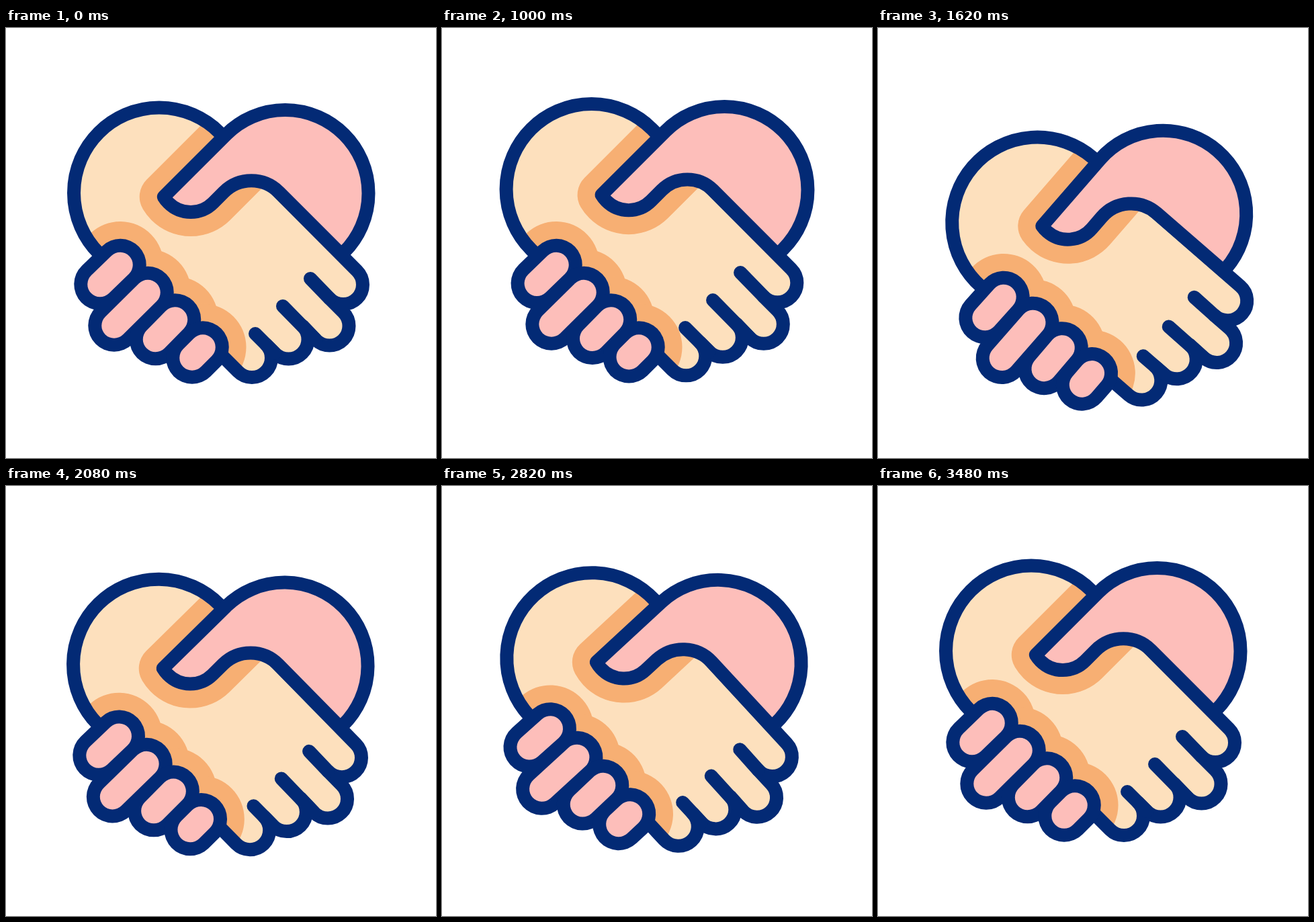
Animation of 640 by 640 pixels, one loop 3600 ms. Source, as an HTML page with a canvas:

```html
<!DOCTYPE html>
<html>
<head>
<meta charset="utf-8">
<style>
html, body { margin: 0; width: 100%; height: 100%; overflow: hidden; background: #fff; }
canvas { display: block; width: 640px; height: 640px; }
</style>
</head>
<body>
<canvas id="stage" width="640" height="640"></canvas>
<script>
const ctx = document.getElementById('stage').getContext('2d');
const NAVY = '#032a75', CREAM = '#fde0bd', PINK = '#fdbeba', SHADE = '#f7af73', SPARK = '#ff9100';
const LOOP = 3600, Q = Math.PI / 4, K = 20.5;

// Each key: time, value(s)
const OPEN = [[0, 0], [570, 1], [1150, 0]];
const SHAKE = [ // time, drop in px, tilt in degrees
  [1120, 0, 0], [1515, 45, -6], [1898, 0, 6], [2280, 45, -6],
  [2664, 0, 6], [3065, 45, -6], [3490, 0, 0]
];

// Right hand: finger tips. Left hand: lower end, upper end, how far the lower end retracts.
const TIPS = [[502, 382], [481.5, 443.5], [420.5, 463.5], [366, 491]];
const KNUCKLES = [
  [140, 381.5, 170, 352.5, 9.5], [161, 443, 211, 393.5, 15],
  [222.5, 463.5, 251.5, 434, 9], [277, 491, 293, 475, 9]
];

const ease = x => x ** 1.73 / (x ** 1.73 + (1 - x) ** 1.73);

function sample(keys, t) {
  if (t <= keys[0][0]) return keys[0].slice(1);
  const i = keys.findIndex(k => k[0] > t);
  if (i < 0) return keys[keys.length - 1].slice(1);
  const a = keys[i - 1], b = keys[i];
  const e = ease((t - a[0]) / (b[0] - a[0]));
  return a.slice(1).map((v, j) => v + (b[j + 1] - v) * e);
}

function stroke(color, width, path, cap = 'round') {
  ctx.strokeStyle = color;
  ctx.lineWidth = width;
  ctx.lineCap = cap;
  ctx.stroke(path);
}

function line(...xy) {
  const p = new Path2D();
  for (let i = 0; i < xy.length; i += 2) p.lineTo(xy[i], xy[i + 1]);
  return p;
}

function fill(color, path) {
  ctx.fillStyle = color;
  ctx.fill(path);
}

function creamHand(u) {
  const p = new Path2D(), s = 39.5 * u, f = 19.5 * u;
  p.moveTo(150, 347);
  p.arc(228 - s, 245.5 - s, 127, 3 * Q, 7 * Q);
  p.lineTo(323.5, 161.5);
  for (const [x, y] of TIPS) p.arc(x - f, y - f, K * Math.SQRT2, -Q, 3 * Q);
  p.lineTo(300, 466);
  p.closePath();
  return p;
}

function pinkArm(u) {
  const p = new Path2D(), s = 36 * u, d = 20.5 * u;
  p.arc(415.5 + s, 246 - s, 124, 5 * Q, 9 * Q);
  p.lineTo(499.5, 337.5);
  p.arcTo(365.2, 203.2, 308, 260.4, 58 - 31.5 * u);
  p.arc(275 + d, 227 - d, 47, Q, 2.6);
  p.closePath();
  return p;
}

function thumbShade(u) {
  const p = new Path2D(), d = 20.5 * u;
  p.moveTo(365.2, 203.2);
  p.arc(275 + d, 227 - d, 47, Q, 2.6);
  p.lineTo(345, 141);
  return p;
}

function drawHands(u) {
  const hand = creamHand(u), arm = pinkArm(u);
  const fingers = KNUCKLES.map(([x, y, x2, y2, d]) => line(x + d * u, y - d * u, x2, y2));

  fill(CREAM, hand);
  ctx.save();
  ctx.clip(hand);
  stroke(SHADE, 72, thumbShade(u), 'butt');
  fingers.forEach(p => stroke(SHADE, 129, p));
  ctx.restore();
  stroke(NAVY, 20, hand);

  for (let i = 0; i < 3; i++) {
    const [x, y] = TIPS[i], g = 65 * u, f = 19.5 * u;
    stroke(NAVY, 20, line(453 - 41 * i - g, 373 + 41 * i - g, x - K - f, y + K - f));
  }

  fill(PINK, arm);
  stroke(NAVY, 20, arm);
  fingers.forEach(p => stroke(NAVY, 77.5, p));
  fingers.forEach(p => stroke(PINK, 37.5, p));
}

function drawSparks(u) {
  const grow = Math.min(1, (u - 0.3) / 0.6);
  if (grow <= 0) return;
  for (const side of [-1, 1]) {
    const ray = (x, y, dx, dy) =>
      stroke(SPARK, 20, line(x, 316 + side * y, x + dx * grow, 316 + side * (y + dy * grow)));
    ray(325.7, 268, 0, 27);
    ray(268, 257, -20, 20);
    ray(383.5, 257, 20, 20);
  }
}

function frame(now) {
  const t = now % LOOP;
  const [u] = sample(OPEN, t), [drop, tilt] = sample(SHAKE, t);
  ctx.fillStyle = '#fff';
  ctx.fillRect(0, 0, 640, 640);
  ctx.lineJoin = 'round';
  ctx.save();
  ctx.translate(320, 120 + drop);
  ctx.rotate(tilt * Math.PI / 180);
  ctx.translate(-320, -120);
  drawHands(u);
  ctx.restore();
  drawSparks(u);
}

const start = performance.now();
(function tick() {
  frame(performance.now() - start);
  requestAnimationFrame(tick);
})();
</script>
</body>
</html>
```
